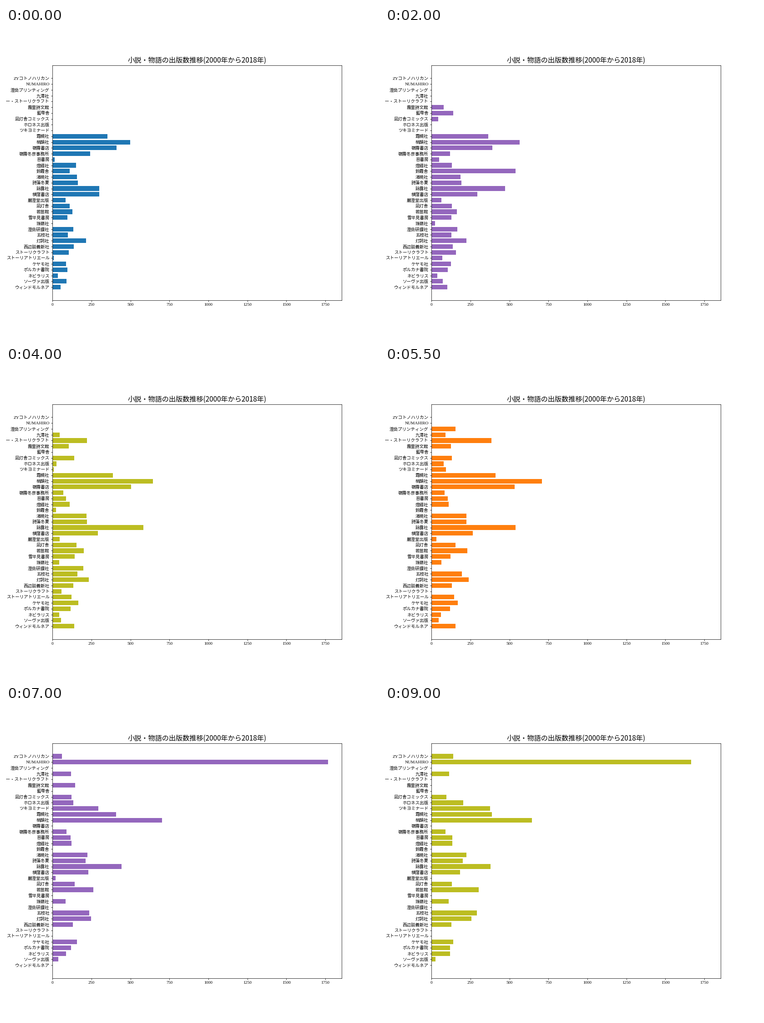
Write a matplotlib script that moves like this. It is 820 px wide and 683 px high and loops after 9.5 s.

```python
import matplotlib.pyplot as plt
import numpy as np
from matplotlib.animation import FuncAnimation

W, H, DPI = 820, 683, 64
PX = 72 / DPI                    # points per pixel
PT = W / 864 * PX                # one layout point on this stage
LAST = 18                        # years run from 2000 to 2018
CJK = "Noto Sans CJK JP"

plt.rcParams.update({
    "font.family": ["Liberation Serif", CJK],
    "font.size": 10 * PT,
    "axes.linewidth": 0.8 * PX,
})
for side in ("xtick", "ytick"):
    plt.rcParams.update({
        f"{side}.major.size": 3.5 * PT,
        f"{side}.major.width": 0.8 * PX,
        f"{side}.major.pad": 3.5 * PT,
    })

names, counts = [], []


def add(name, *points, start=0, end=LAST):
    """A publisher active from start to end, its key points evenly spread."""
    years = np.linspace(start, end, len(points))
    names.append(name)
    counts.append(np.interp(range(LAST + 1), years, points, left=0, right=0))


# top to bottom
add("ZYコトノハリカン", 19, 125, 139, start=13)
add("NUMAHIRO", 401, *np.linspace(1767, 1665, 5), start=13)
add("澄岳プリンティング", 100, 153, 107, start=9, end=13)
add("九澪社", 45, 121, 112, start=8)
add("ソルミー・ストーリクラフト", 220, 400, 325, start=8, end=13)
add("霧里詩文館", 70, 145, start=3, end=14)
add("藍雫舎", 60, 180, start=2, end=5)
add("凪灯舎コミックス", 20, 139, 127, 95, start=3)
add("ホロネス出版", 8, 105, 205, start=7)
add("ツキヨミナード", 7, 60, 226, 400, 375, start=8)
add("霜槻社", 352, 372, 420, 387)
add("梢韻社", 498, 600, 731, 644)
add("嶺霧書店", 410, 375, 440, 580, 460, end=13)
add("嶺霧冬彦事務所", 241, 60, 90, 90)
add("苔書房", 13, 95, 135)
add("燈綴社", 150, 105, 133)
add("鈴霞舎", 109, 300, 538, 763, 22, end=8)
add("渚暁社", 156, 225, 225)
add("詩藻冬夏", 162, 230, 200)
add("詠露社", 299, 495, 610, 450, 380)
add("槙窪書店", 299, 290, 182)
add("巌澄堂出版", 85, 40, 2)
add("凪灯舎", 109, 160, 130)
add("若苗館", 127, 210, 302)
add("雪平見書房", 95, 150, 111, end=13)
add("珠嶺社", 1, 50, 110)
add("澄岳研鑽社", 133, 205, end=9)
add("五枝社", 98, 168, 290)
add("灯詞社", 215, 255)
add("西辺談義新社", 138, 128)
add("ストーリクラフト", 105, 158, 59, end=8)
add("ストーリアトリエール", 8, 110, 160, end=13)
add("ケヤモ社", 86, 175, 140)
add("ポルカナ書院", 95, 118, 120)
add("ネビラリス", 33, 45, 118)
add("ソーヴァ出版", 90, 50, 27)
add("ウィンドモルネア", 53, 130, 165, end=13)

counts = np.array(counts)
rows = np.arange(len(names))[::-1]

fig, ax = plt.subplots(figsize=(W / DPI, H / DPI), dpi=DPI)
fig.subplots_adjust(left=102.2 / W, right=0.9, bottom=0.125, top=0.88)
bars = ax.barh(rows, counts[:, 0], height=0.8)
ax.set_yticks(rows, names)
ax.set_xticks(range(0, 1751, 250))
ax.set_xlim(0, counts.max() * 1.05)
ax.set_ylim(-2.24, len(names) + 1.24)
ax.set_title("小説・物語の出版数推移(2000年から2018年)",
             family=CJK, fontsize=16 * PT, pad=6 * PT)


def draw(year):
    for bar, count in zip(bars, counts[:, year]):
        bar.set_width(count)
        bar.set_facecolor(f"C{year % 10}")
    return list(bars)


anim = FuncAnimation(fig, draw, frames=LAST + 1, interval=500,
                     repeat=True, repeat_delay=0)
plt.show()
```
